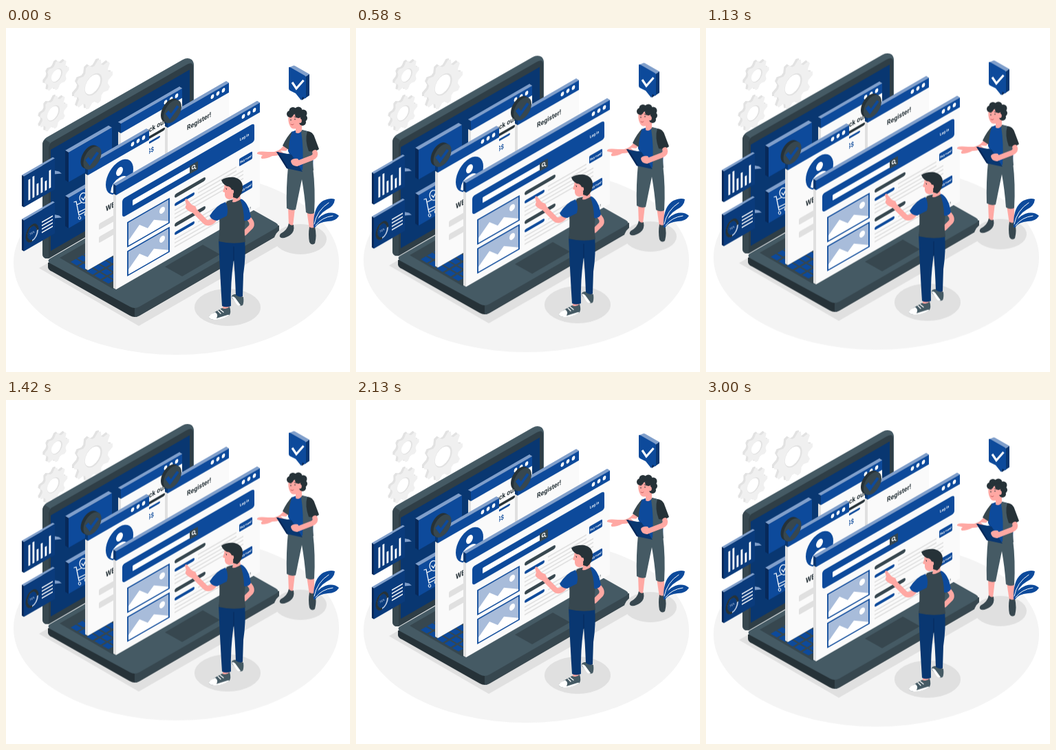
An HTML page that plays this animation: 500 by 500 pixels, repeating every 3040 ms.

```html
<!DOCTYPE html>
<html lang="en">
<head>
<meta charset="utf-8">
<title>Website building</title>
<style>
html, body { margin: 0; width: 100%; height: 100%; overflow: hidden; background: #fff; }
svg { display: block; width: 100vw; height: 100vh; }
text { font-family: Roboto, "Open Sans", sans-serif; font-weight: 700; }
</style>
</head>
<body>
<svg id="stage" viewBox="0 0 500 500"></svg>
<script>
const BLUE = '#0d4a9b', SHADE = '#0a3b7c', NAVY = '#093771', DEEP = '#07295a', PALE = '#809fcb', ICE = '#a8bcda';
const INK = '#263238', DARK = '#37474f', SLATE = '#455a64', SKIN = '#ffa8a3', GREY = '#e0e0e0';
const SLOPE = 0.577;

const shape = (points, fill) => `<polygon points="${points}" fill="${fill}"/>`;
const path = (d, fill, more = '') => `<path d="${d}" fill="${fill}" ${more}/>`;
const line = (d, color, width) => path(d, 'none',
  `stroke="${color}" stroke-width="${width}" stroke-linecap="round" stroke-linejoin="round"`);
const tick = (d, color, width) => path(d, 'none', `stroke="${color}" stroke-width="${width}"`);
const oval = (x, y, rx, ry, fill, more = '') =>
  `<ellipse cx="${x}" cy="${y}" rx="${rx}" ry="${ry}" fill="${fill}" ${more}/>`;
const ring = (x, y, rx, ry, color, width) =>
  oval(x, y, rx, ry, 'none', `stroke="${color}" stroke-width="${width}"`);
const rect = (x, y, w, h, fill, r = 0, more = '') =>
  `<rect x="${x}" y="${y}" width="${w}" height="${h}" rx="${r}" fill="${fill}" ${more}/>`;
const range = n => [...Array(n).keys()];
const each = (list, fn) => list.map(fn).join('');

// Plane rising to the right; x stays in stage pixels.
const iso = (x, y, body) => `<g transform="matrix(1 ${-SLOPE} 0 1 ${x} ${y})">${body}</g>`;
const label = (x, y, size, fill, words, anchor = 'start') =>
  `<text transform="translate(${x} ${y}) scale(.866 1)" font-size="${size}" fill="${fill}" text-anchor="${anchor}">${words}</text>`;

// Solid slab: front face with a lit top and a shaded left side.
function slab(x, y, w, h, d, face, top, side) {
  const k = d * SLOPE;
  return iso(x, y,
    shape(`0,0 ${w},0 ${w - d},${-2 * k} ${-d},${-2 * k}`, top) +
    shape(`0,0 ${-d},${-2 * k} ${-d},${h - 2 * k} 0,${h}`, side) +
    rect(0, 0, w, h, face));
}

function browser(x, y, w, h, body = '') {
  const bar = 14;
  return slab(x, y, w, h, 4, '#fafafa', PALE, GREY) +
    slab(x, y, w, bar, 4, BLUE, PALE, NAVY) +
    iso(x, y, each([24, 16, 8], n => oval(w - n, 6.3, 2.4, 3, '#fff')) + body);
}

function gear(x, y, r, teeth) {
  const outline = range(teeth * 4).map(i => {
    const a = (i - .5) * Math.PI / (teeth * 2);
    const q = i % 4 < 2 ? r : r * .8;
    return `${(q * Math.cos(a)).toFixed(1)},${(q * Math.sin(a)).toFixed(1)}`;
  }).join(' ');
  const layer = (dx, dy, fill) =>
    `<g transform="matrix(.866 -.5 0 1 ${x + dx} ${y + dy})">${shape(outline, fill)}` +
    `<circle r="${r * .45}" fill="#e2e2e2"/></g>`;
  return layer(-3, -1.7, '#e2e2e2') + layer(0, 0, '#f0f0f0') +
    `<g transform="matrix(.866 -.5 0 1 ${x - 1} ${y})"><circle r="${r * .4}" fill="#fff"/></g>`;
}

const badge = (x, y) =>
  each([4, 2], n => iso(x - n, y - n / 2, oval(0, 0, 13, 15, INK))) +
  iso(x, y, oval(0, 0, 13, 15, DARK) + tick('M-8 -4 L-3 5.500 L8 -3.500', BLUE, 5));

function laptop() {
  const keys = each(range(12), i => each(range(5), j => {
    const x = 94 + i * 9.5 + j * 11.5, y = 340 - i * 5.5 + j * 6.6;
    return shape(`${x},${y} ${x + 7.5},${y - 4.3} ${x + 16.5},${y + .9} ${x + 9},${y + 5.2}`, BLUE);
  }));
  return shape('48,349 193,433 405,311 260,227', GREY) +
    path('M61 341 L61 348 Q62 352 67 354 L180 418 Q187 422 194 418 L392 303 Q397 300 397 295 L397 287Z', INK) +
    path('M187 407 L397 287 L397 295 Q397 300 392 303 L194 418 Q191 420 187 420Z', DARK) +
    path('M64 335 L265 219 Q272 215 279 219 L392 283 Q399 287 392 291 L194 405 Q187 409 180 405 L64 342 Q59 338 64 335Z', SLATE) +
    shape('78,334 245,238 322,282 155,379', DARK) + keys +
    shape('231,347 286,315 311,329 256,361', DARK) +
    path('M53 170 Q53 163 59 159 L257 46 Q264 42 270 46 Q273 49 273 54 L273 212 L62 335 Q53 336 53 328Z', SLATE) +
    path('M62 174 Q62 169 66 166 L263 53 Q272 48 272 57 L272 213 L62 335Z', '#2f3e46') +
    path('M53 170 Q53 165 57 162 L64 167 Q62 170 62 174 L62 335 Q53 336 53 328Z', DARK) +
    iso(65, 177, rect(0, 0, 202, 147, NAVY));
}

function tiles() {
  return slab(91, 181, 63, 43, 5, BLUE, PALE, DEEP) +
    slab(91, 247, 63, 44, 5, BLUE, PALE, DEEP) +
    line('M99 253 L102 252 L106 272 L119 265 M103 257 L119 249 M105 268 L119 261', '#fff', 1.3) +
    oval(113, 247, 6, 7.4, BLUE, 'stroke="#fff" stroke-width="1.2"') +
    line('M110 247 L112.500 250 L116 243', '#fff', 1.3) +
    ring(107, 276, 1.8, 2.2, '#fff', 1) + ring(116, 271, 1.8, 2.2, '#fff', 1);
}

function backWindows() {
  return browser(167, 139, 89, 95,
      label(65, 36.500, 10, INK, 'Check out', 'end') +
      rect(34, 42, 30, 4, INK, 2) + rect(34, 50, 23, 3, BLUE, 1.500) +
      label(39, 67, 9, BLUE, '$$')) +
    browser(235, 131, 89, 121, label(28, 34, 10, INK, 'Register!')) +
    browser(119, 200, 89, 152,
      oval(46, 43, 20, 23, BLUE) +
      path('M33 58 Q34 44 46 44 Q58 44 59 58 Q46 70 33 58Z', '#fff') +
      oval(46, 35, 6, 7, '#fff', `stroke="${BLUE}" stroke-width="2"`) +
      label(26, 82, 11, INK, 'WELCOME') +
      rect(16, 94, 55, 9, GREY, 2) + rect(16, 113, 55, 9, GREY, 2)) +
    badge(125.5, 189) + badge(242, 121.5);
}

function panels() {
  const bars = [[6.5, 30], [12.5, 31], [18.5, 17], [24.5, 22], [30.5, 14], [36.5, 26]];
  const panel = (y, body) =>
    shape(`70,${y - 8} 81,${y - 4} 70,${y + 3}`, NAVY) +
    shape(`67,${y - 9} 77,${y - 7} 81,${y - 4} 70,${y - 3}`, PALE) +
    slab(26, y, 45, 45, 3, SHADE, PALE, DEEP) + iso(26, y, body);
  return panel(215.5, each(bars, ([x, h]) => rect(x, 39 - h, 2.8, h, '#fff'))) +
    panel(279.5,
      ring(12, 25.5, 8, 11, '#c3d0e4', 2) +
      path('M12 36.500 A8 11 0 1 1 20 25.500', 'none', `stroke="${INK}" stroke-width="3"`) +
      label(12, 27, 4.5, ICE, '75%', 'middle') +
      each(range(4), i => rect(26, 17 + i * 5, 16, 1.8, '#fff')));
}

function frontWindow() {
  const picture = y => rect(17, y, 60, 35, ICE, 0, `stroke="${BLUE}" stroke-width="1.800"`) +
    path(`M18 ${y + 34} V${y + 27} L34 ${y + 13} L46 ${y + 25} L55 ${y + 18} L76 ${y + 32} V${y + 34}Z`, '#fff') +
    oval(67, y + 11, 4, 4.600, '#fff');
  const item = y => rect(85, y, 45, 5.500, DARK, 2.700) + rect(85, y + 13, 29, 4.500, BLUE, 2.200) +
    each(range(5), i => rect(i < 2 ? 119 : 85, y + 11 + i * 5.600, i < 2 ? 56 : 100, 1.800, GREY)) +
    rect(179, y + 2.5, 19, 11, BLUE, 1.500) + label(180.300, y + 10, 4.800, '#fff', 'Buy now!');
  return browser(160, 229, 209, 151,
    rect(9, 25, 192, 27, BLUE, 4) +
    rect(24, 35, 84, 8, '#fff', 1) + rect(107, 33, 12, 12, DARK, 1) +
    ring(112.5, 38, 2, 2.3, '#fff', 1.2) + line('M114 40 L116 42', '#fff', 1.2) +
    label(180, 39, 5.500, '#fff', 'Log in') +
    picture(63.5) + picture(105.5) + item(62) + item(104) +
    label(192, 147, 5, INK, 't !'));
}

function man() {
  return oval(322, 406, 48, 27, GREY) +
    shape('315,401 325,401 325,409 315,410', SKIN) + shape('335,385 343,387 344,394 336,393', SKIN) +
    path('M336 387 Q341 390 345 391 Q346 399 344 403 Q340 405 337 402 L328 392 Q327 388 332 387Z', SLATE) +
    path('M328 391 Q330 389 333 392 L341 403 Q338 405 335 401Z', '#fff') +
    path('M314 407 Q320 410 325 405 Q328 414 324 418 Q312 424 302 424 Q294 423 295 419 Q304 412 314 407Z', SLATE) +
    path('M295 419 Q299 415 304 413 Q309 416 306 422 L322 417 Q325 416 324 418 Q312 425 302 424 Q294 423 295 419Z', '#fff') +
    line('M308 411 L312 415 M311 409 L316 413', '#fff', 1.3) +
    path('M309 307 L347 307 Q349 331 345 358 L344 390 Q339 392 334 388 Q333 360 331 336 Q326 370 327 404 Q320 407 314 404 Q311 358 309 307Z', NAVY) +
    line('M331 318 L331 337', DEEP, 1) +
    line('M302 279 Q294 287 288 280 L272 264', SKIN, 8) +
    path('M260 250 Q262 246 265 251 L270 257 L275 259 Q279 264 275 268 Q268 269 263 264 Q259 261 262 257Z', SKIN) +
    line('M351 275 Q360 283 356 289 L347 298', SKIN, 7) +
    path('M321 252 Q334 246 344 250 Q349 258 349 273 Q345 291 348 311 Q330 315 309 310 Q311 291 310 274Z', DARK) +
    path('M319 253 Q306 257 296 273 Q299 280 307 280 L321 273 Q324 262 319 253Z', BLUE) +
    path('M340 248 Q352 251 356 275 Q353 281 346 280 Q346 263 340 248Z', BLUE) +
    path('M318 226 Q317 234 315 238 L318 239 Q317 248 324 249 L330 248 L329 253 Q334 254 341 249 L338 229Z', SKIN) +
    path('M313 221 Q321 216 332 217 Q344 220 344 231 Q344 242 336 248 L330 246 Q331 241 328 235 Q326 230 321 230 Q315 227 313 221Z', INK) +
    oval(329, 238, 2.200, 3, SKIN) + line('M320 233 L320.500 234.500', INK, 1);
}

function woman() {
  const curls = [[413, 125, 5], [417, 120.5, 5.5], [425, 120, 5.5], [432, 124, 5.5],
    [433, 131, 5], [431, 137, 5], [425, 126, 5]];
  return oval(428, 307, 38, 22, GREY) +
    shape('410,260 420,262 417,288 411,287', SKIN) + shape('437,265 448,266 448,292 441,292', SKIN) +
    path('M411 284 Q414 288 418 286 Q420 296 413 301 Q406 306 400 305 Q396 303 399 299 Q409 294 411 284Z', DARK) +
    path('M441 289 Q445 292 449 289 Q452 302 449 313 Q444 317 441 311 Q439 300 441 289Z', DARK) +
    path('M410 202 L446 202 Q450 235 448 269 Q442 272 436 268 Q434 242 430 220 Q425 244 421 264 Q414 266 408 262 Q407 232 410 202Z', SLATE) +
    path('M406 167 Q400 178 390 180 Q380 180 373 179.500 Q364 179 365 183 L373 185 Q369 188 372 190 Q380 190 387 186 Q403 186 412 173Z', SKIN) +
    path('M415 151 Q424 146 438 150 Q449 154 447 175 L446 206 Q428 208 410 203 Q409 175 412 158Z', BLUE) +
    path('M430 148 Q446 150 448 163 Q444 183 447 207 L431 207 Q433 174 429 151Z', SLATE) +
    path('M416 150 Q408 158 402 171 L411 177 Q411 163 416 150Z', DARK) +
    path('M438 150 Q446 150 449 160 L455 176 Q449 181 440 179 Q434 163 438 150Z', INK) +
    shape('393,180 415,184 431,209 408,204', NAVY) + shape('393,180 396,180 411,205 408,204', DEEP) +
    shape('399,178 410,179 412,183 402,181', '#fff') +
    line('M449 181 Q451 186 444 189 L423 197', SKIN, 7.500) +
    path('M424 190 Q417 189 414 193 Q414 200 423 201 L430 198Z', SKIN) +
    path('M411 126 Q409 136 413 143 Q416 148 421 146 L421 152 Q426 155 430 149 L430 139 L429 125Z', SKIN) +
    each(curls, ([x, y, r]) => oval(x, y, r, r, INK)) +
    oval(427, 135, 2.800, 3.300, SKIN) +
    line('M414 133 L414 134 M420 132 L420 133', INK, 1.200) +
    line('M413 130 L415 130 M419 129 L422 130', INK, .8) +
    line('M414 140 Q416 142 418 140', '#c9585a', .9);
}

const notice = () =>
  shape('428,98 430,105 436,101 436,92', DEEP) +
  path('M412 57 L417 55 Q418 54 420 55 L441 67 L435 71Z', PALE) +
  shape('435,71 441,67 441,98 435,102', NAVY) +
  path('M411 58 Q411 56 413 57 L434 69 Q436 70 436 72 V101 Q436 103 434 102 L431 100 L429 105 L421 95 L413 91 Q411 90 411 88Z', BLUE) +
  tick('M416 79 L422 88 L432.500 76', '#fff', 3.2);

const plant = () =>
  path('M447 289 Q446 260 461 251 Q472 246 478 249 Q477 259 466 264 Q453 271 449 289Z', BLUE) +
  line('M448 285 Q452 265 469 254', '#fff', 1) +
  path('M447 290 Q451 275 464 270 Q476 266 484 273 Q479 281 468 281 Q454 282 449 290Z', BLUE) +
  line('M450 287 Q459 275 475 273', '#fff', 1);

// Gears and plant stand still; everything else floats as one scene.
document.getElementById('stage').innerHTML =
  gear(127, 82, 32.5, 10) + gear(74, 69, 20.5, 8) + gear(69, 124, 23.5, 9) +
  `<g id="scene">${oval(247.5, 341, 236.5, 134, '#f4f4f4')}${laptop()}${tiles()}${backWindows()}` +
  `${panels()}${frontWindow()}${man()}${woman()}${notice()}</g>` + plant();

document.getElementById('scene').animate(
  [0, -10, 0].map(y => ({ transform: `translateY(${y}px)` })),
  { duration: 3040, iterations: Infinity, easing: 'linear' });
</script>
</body>
</html>
```
